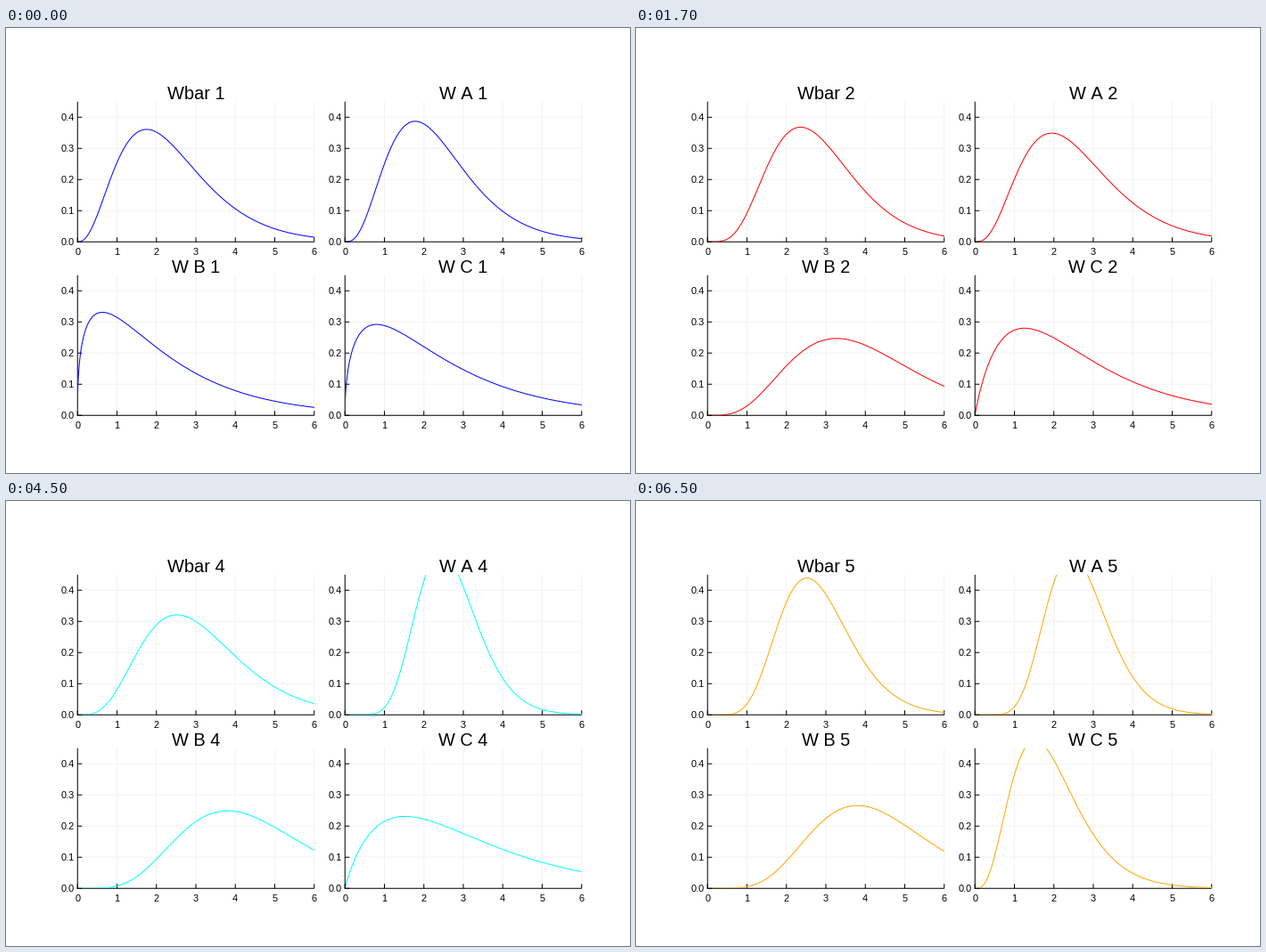
A matplotlib script that plays this animation: 700 by 500 pixels, repeating every 8000 ms.

```python
import math

import matplotlib.pyplot as plt
import numpy as np
from matplotlib.animation import FuncAnimation
from matplotlib.patches import Rectangle

WIDTH, HEIGHT, DPI = 700, 500, 100
PX = 72 / DPI
INTERVAL, LOOP, STEP, FIRST_STEP = 500, 8000, 2000, 500
X_UNIT, Y_UNIT = 44.25, 350
X_MAX, Y_MAX = 6, 0.45
FONT = "Liberation Sans"
COLORS = ["blue", "red", "green", "cyan", "orange"]

# Per panel: mode at the start, mode it settles at, share of the gap left
# after one step, and the peak height at each step.
PANELS = {
    "Wbar": (1.75, 2.52, 0.21, [0.361, 0.368, 0.382, 0.321, 0.439]),
    "W A": (1.78, 2.44, 0.75, [0.387, 0.349, 0.463, 0.52, 0.51]),
    "W B": (0.63, 3.80, 0.167, [0.331, 0.247, 0.272, 0.249, 0.266]),
    "W C": (0.80, 1.52, 0.37, [0.292, 0.28, 0.259, 0.231, 0.475]),
}

# Denser near zero, where some curves rise steeply.
xs = X_MAX * np.linspace(0, 1, 240) ** 2


def settle(start, end, left_over, step):
    return end + (start - end) * left_over ** step ** 3


def gamma_density(x, mode, peak):
    # Invert Stirling's series to get the exponent from mode and peak.
    power = 2 * math.pi * (mode * peak) ** 2 + 1 / 6
    power -= 1 / (72 * power)
    ratio = x / mode
    return peak * ratio ** power * np.exp(power * (1 - ratio))


# Letters keep their plain advance widths.
plt.rcParams["text.kerning_factor"] = 6
fig = plt.figure(figsize=(WIDTH / DPI, HEIGHT / DPI), dpi=DPI,
                 facecolor="white")
ax = fig.add_axes([0, 0, 1, 1])
ax.set_xlim(0, WIDTH)
ax.set_ylim(HEIGHT, 0)
ax.axis("off")


def segment(x0, y0, x1, y1, color="black", z=2):
    ax.plot([x0, x1], [y0, y1], color=color, lw=PX, zorder=z, snap=False,
            solid_capstyle="butt")


def label(x, y, text, size, align="center"):
    return ax.text(x, y, text, fontname=FONT, fontsize=size * PX, ha=align,
                   va="baseline", color="black", zorder=4)


def make_panel(left, bottom):
    right, top = left + X_MAX * X_UNIT, bottom - Y_MAX * Y_UNIT
    for i in range(X_MAX + 1):
        x = left + i * X_UNIT
        segment(x, bottom, x, top, "#f2f2f2", 1)
        segment(x, bottom, x, bottom - 5)
        label(x, bottom + 14.7, str(i), 11)
    for i in range(5):
        y = bottom - i * 0.1 * Y_UNIT
        segment(left, y, right, y, "#f2f2f2", 1)
        segment(left, y, left + 5, y)
        label(left - 3.1, y + 4, f"{i / 10:.1f}", 11, "right")
    segment(left, bottom + 0.5, left, top)
    segment(left - 0.5, bottom, right, bottom)

    curve, = ax.plot([], [], lw=PX, zorder=3)
    curve.set_clip_path(Rectangle((left + 0.5, top), right - left - 0.5,
                                  bottom - top, transform=ax.transData))
    title = label((left + right) / 2, top - 2.8, "", 20)
    return curve, title


origins = [(80.25 + 300 * column, 240.25 + 195 * row)
           for row in range(2) for column in range(2)]
artists = [make_panel(*origin) for origin in origins]


def update(frame):
    step = (frame * INTERVAL + STEP - FIRST_STEP) // STEP
    for (left, bottom), (curve, title), (name, (*mode, peaks)) in zip(
            origins, artists, PANELS.items()):
        ys = gamma_density(xs, settle(*mode, step), peaks[step])
        curve.set_data(left + xs * X_UNIT, bottom - ys * Y_UNIT)
        curve.set_color(COLORS[step])
        title.set_text(f"{name} {step + 1}")
    return [artist for pair in artists for artist in pair]


anim = FuncAnimation(fig, update, frames=LOOP // INTERVAL, interval=INTERVAL,
                     repeat=True, repeat_delay=0)
plt.show()
```
